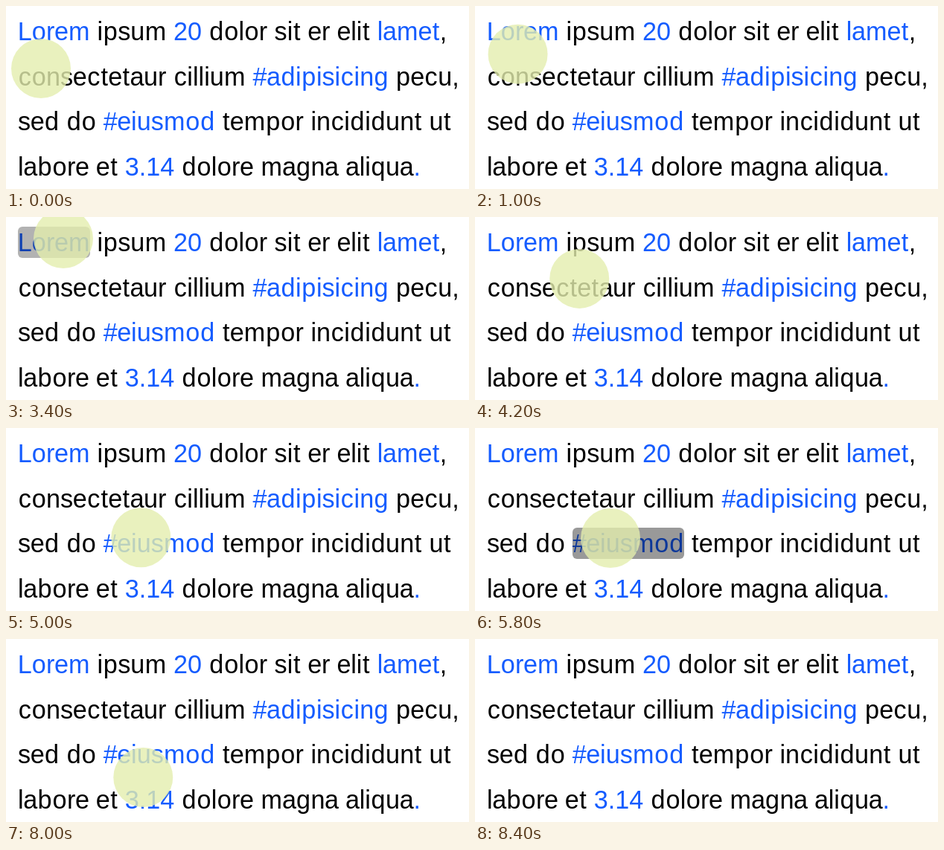
Recreate the animation shown at these times as an HTML page with a canvas. Size 622 by 246 pixels, loop 9600 ms.

```html
<!DOCTYPE html>
<html lang="en">
<head>
<meta charset="utf-8">
<title>Touch highlights</title>
<style>
html, body { margin: 0; width: 100%; height: 100%; overflow: hidden; background: #fff; }
canvas { display: block; }
</style>
</head>
<body>
<canvas id="stage" width="622" height="246"></canvas>
<script>
const ctx = document.getElementById('stage').getContext('2d');
const LOOP = 9600, STEP = 200;
const SIZE = 34.2, LEFT = 16, BASELINE = 46, LEADING = 60.5;

// Braces mark links.
const lines = [
  '{Lorem} ipsum {20} dolor sit er elit {lamet},',
  'consectetaur cillium {#adipisicing} pecu,',
  'sed do {#eiusmod} tempor incididunt ut',
  'labore et {3.14} dolore magna aliqua{.}'
];

const smooth = p => p * p * (3 - 2 * p);
const speedUp = p => p * p;
const slowDown = power => p => 1 - (1 - p) ** power;

const origin = { x: 47, y: 84 };
const moves = [
  { from: 600, to: 1600, x: 77, y: 29, easeX: smooth, easeY: smooth },
  { from: 3800, to: 5000, x: 181.3, y: 147.3, easeX: slowDown(2.3), easeY: slowDown(1.5) },
  { from: 5000, to: 5400, x: 182, y: 148, easeX: smooth, easeY: smooth },
  { from: 7600, to: 8400, x: 191, y: 300, easeX: speedUp, easeY: speedUp }
];

const presses = [
  { from: 2200, to: 3600, x: 16, y: 13, width: 97 },
  { from: 5600, to: 7200, x: 131, y: 134, width: 150 }
];

// Optical spacing: letter groups set looser or tighter than the font's default.
function spacing(ch) {
  if ('bcdpqt'.includes(ch)) return 0.037 * SIZE;
  if ('gmo'.includes(ch)) return 0.019 * SIZE;
  if ('aeL'.includes(ch)) return -0.019 * SIZE;
  return 0;
}

function drawLine(line, row) {
  const y = Math.round(BASELINE + LEADING * row);
  let x = LEFT;
  ctx.fillStyle = '#000';
  for (const ch of line) {
    if (ch === '{') ctx.fillStyle = '#155cff';
    else if (ch === '}') ctx.fillStyle = '#000';
    else {
      const extra = spacing(ch);
      ctx.fillText(ch, x + extra / 2, y);
      x += ctx.measureText(ch).width + extra;
    }
  }
}

function pressAlpha({ from, to }, t) {
  if (t < from || t >= to) return 0;
  if (t < from + STEP) return 0.2;
  return t < from + 1200 ? 0.4 : 0.3;
}

function drawPress(press, t) {
  ctx.fillStyle = `rgba(0, 0, 0, ${pressAlpha(press, t)})`;
  ctx.beginPath();
  ctx.roundRect(press.x, press.y, press.width, 42, 6);
  ctx.fill();
}

function fingerAt(t) {
  let { x, y } = origin;
  for (const m of moves) {
    const p = Math.min(1, Math.max(0, (t - m.from) / (m.to - m.from)));
    x += (m.x - x) * m.easeX(p);
    y += (m.y - y) * m.easeY(p);
  }
  return { x, y };
}

function drawFinger(t) {
  const { x, y } = fingerAt(t);
  ctx.fillStyle = 'rgba(228, 238, 174, 0.8)';
  ctx.beginPath();
  ctx.arc(x, y, 40, 0, Math.PI * 2);
  ctx.fill();
}

function draw(now) {
  // The picture advances in whole steps.
  const t = Math.floor((now % LOOP) / STEP) * STEP;
  ctx.fillStyle = '#fff';
  ctx.fillRect(0, 0, 622, 246);
  ctx.font = `${SIZE}px "Liberation Sans", Arial, sans-serif`;
  lines.forEach(drawLine);
  presses.forEach(press => drawPress(press, t));
  drawFinger(t);
}

const start = performance.now();
function tick() {
  draw(performance.now() - start);
  requestAnimationFrame(tick);
}
tick();
</script>
</body>
</html>
```
